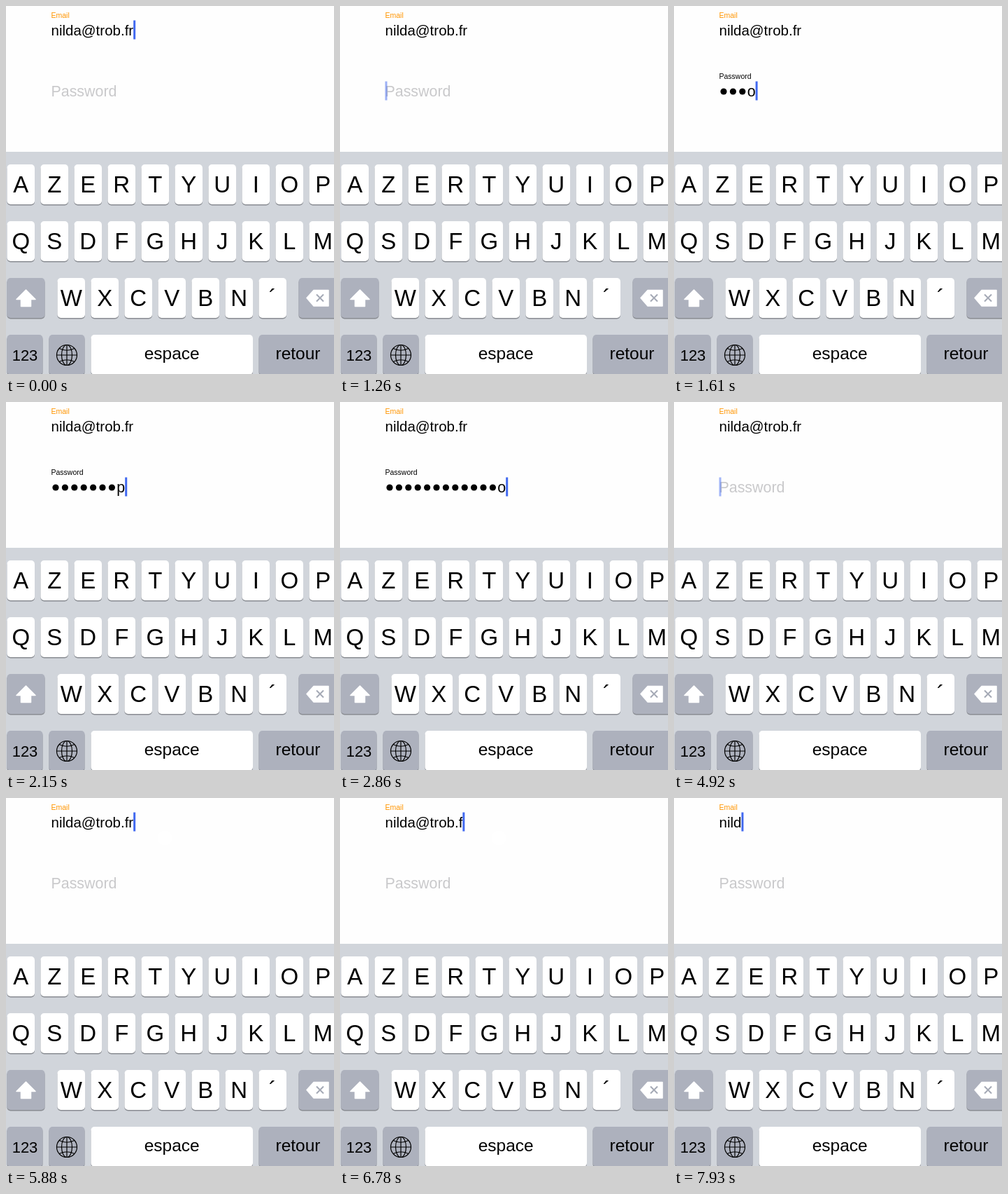
An HTML page for the animation above (8000 ms loop, 469x525 px).

```html
<!DOCTYPE html>
<html lang="fr">
<head>
<meta charset="utf-8">
<title>Login form</title>
<style>
  html, body { margin: 0; width: 100%; height: 100%; overflow: hidden; background: #fefefe; }
  svg { display: block; font-family: "Liberation Sans", Arial, sans-serif; }
  .field { font-size: 21.4px; }
  .label { font-size: 10.5px; }
  .key { font-size: 33px; text-anchor: middle; }
  .word { font-size: 24.5px; text-anchor: middle; }
  .digits { font-size: 22px; text-anchor: middle; }
  .handle { fill: #0a6be0; }
</style>
</head>
<body>
<svg width="469" height="525" viewBox="0 0 469 525">
  <circle id="touch" cx="227" cy="57" r="10.5" fill="#fff"/>
  <text class="label" x="64.5" y="17" fill="#ff9500">Email</text>
  <text id="email" x="64.5" y="42" font-size="20.5"></text>
  <text class="field" id="hint" x="64.5" y="129" fill="#c9c9cb">Password</text>
  <text class="label" id="label" x="64.5">Password</text>
  <g id="dots"></g>
  <text class="field" id="last" y="129"></text>
  <rect id="caret" width="3" height="27" fill="#4169f0"/>
  <g id="selection" class="handle">
    <rect x="66" y="108" width="199" height="26.5" opacity=".2"/>
    <rect x="64.5" y="100" width="3" height="34.5"/>
    <rect x="263.5" y="107.5" width="3" height="35"/>
    <circle cx="66" cy="100.5" r="8.2"/>
    <circle cx="264.7" cy="142.5" r="8.2"/>
  </g>
  <rect y="208" width="469" height="317" fill="#d1d5db"/>
  <g id="keys"></g>
  <g fill="#fff" stroke="#fff" stroke-width="1.5" stroke-linejoin="round">
    <path d="M28.5 405 42 418.5H35.5V428.5H21.5V418.5H15Z"/>
    <path d="M430 416.5 440 405.5H461V428H440Z"/>
  </g>
  <path d="M444 411.5 454 421.5M454 411.5 444 421.5" stroke="#a4a9b5" stroke-width="2"/>
  <g fill="none" stroke="#000" stroke-width="1.2">
    <circle cx="87" cy="498" r="14.5"/>
    <ellipse cx="87" cy="498" rx="7.5" ry="14.5"/>
    <path d="M87 483.5V512.5M72.5 498H101.5M76 488.5Q87 494 98 488.5M76 507.5Q87 502 98 507.5"/>
  </g>
</svg>
<script>
const $ = id => document.getElementById(id);
const LOOP = 8000, LEFT = 64.5, DOT = 13.4;
const EMAIL = "nilda@trob.fr", SECRET = "strong-password";

// Moments of the story, in ms
const TO_PASSWORD = 270, TYPE = 1350, TYPED = 3040, SELECT = 3670, CLEAR = 4120;
const TOUCH = 5360, TO_EMAIL = 5880, ERASE = 6780, REPEAT = 6965, RELEASE = 7925;
const REPEAT_EVERY = 120;

function add(parent, name, attrs, text = "") {
  const el = document.createElementNS("http://www.w3.org/2000/svg", name);
  for (const k in attrs) el.setAttribute(k, attrs[k]);
  el.textContent = text;
  parent.append(el);
  return el;
}

function key(x, y, w, text, grey, cls = "key", base = y + 40) {
  const box = { x, width: w, height: 57, rx: 5 };
  add($("keys"), "rect", { ...box, y: y + 1.5, fill: "#898c92" });
  add($("keys"), "rect", { ...box, y, fill: grey ? "#adb1bd" : "#fff" });
  add($("keys"), "text", { x: x + w / 2, y: base, class: cls }, text);
}

["AZERTYUIOP", "QSDFGHJKLM", "WXCVBN´"].forEach((chars, r) =>
  [...chars].forEach((c, i) => key((r < 2 ? 1.5 : 73.5) + 48 * i, 226 + 81 * r, 39.5, c)));
key(1.5, 388, 54, "", true);
key(418.5, 388, 60, "", true);
key(1.5, 469, 51, "123", true, "digits", 506);
key(61.5, 469, 51, "", true);
key(121.5, 469, 231.5, "espace", false, "word", 504);
key(361.5, 469, 112, "retour", true, "word", 504);

const dots = [...SECRET].map((_, i) =>
  add($("dots"), "circle", { cx: 71 + DOT * i, cy: 122, r: 4.6 }));

const clamp = v => Math.min(1, Math.max(0, v));
const ramp = (t, from, to) => clamp((t - from) / (to - from));
const show = (id, opacity) => $(id).setAttribute("opacity", +opacity);

// Typing starts fast and slows down a little.
function typedCount(t) {
  if (t < TYPE || t >= CLEAR) return 0;
  return 1 + Math.floor((SECRET.length - 1) * ramp(t, TYPE, TYPED) ** .76);
}

// A held delete key: one character, a pause, then steady repeats.
function erasedCount(t) {
  if (t < ERASE) return 0;
  const held = Math.min(t, RELEASE - 1) - REPEAT;
  return 1 + Math.max(0, Math.ceil((held + 1) / REPEAT_EVERY));
}

// One soft blink, centred 765 ms after the caret was last reset.
const blink = age => clamp((Math.abs(age - 765) - 180) / 90);

function draw(t) {
  const erased = erasedCount(t), n = typedCount(t);
  $("email").textContent = EMAIL.slice(0, EMAIL.length - erased);

  dots.forEach((d, i) => d.setAttribute("opacity", +(i < n - 1)));
  const lastX = LEFT + DOT * Math.max(0, n - 1);
  $("last").textContent = n ? SECRET[n - 1] : "";
  $("last").setAttribute("x", lastX);
  show("hint", !n);

  const rise = 1 - (1 - ramp(t, TYPE, TYPE + 300)) ** 2;
  show("label", rise * (1 - ramp(t, CLEAR, CLEAR + 90)));
  $("label").setAttribute("y", 114 - 10 * rise);

  const inEmail = t < TO_PASSWORD || t >= TO_EMAIL;
  const end = inEmail ? LEFT + $("email").getComputedTextLength()
    : lastX + (n && $("last").getComputedTextLength());
  const reset = t >= TO_EMAIL ? TO_EMAIL : t >= CLEAR ? CLEAR + 260 : TO_PASSWORD;
  const selecting = t >= SELECT && t < CLEAR;
  $("caret").setAttribute("x", end);
  $("caret").setAttribute("y", inEmail ? 20.5 : 107.5);
  show("caret", selecting ? 0 : erased ? 1 : blink(t - reset));
  show("selection", selecting);
  show("touch", t >= TOUCH && t < RELEASE);
}

const start = performance.now();
function tick() {
  draw((performance.now() - start) % LOOP);
  requestAnimationFrame(tick);
}
tick();
</script>
</body>
</html>
```
